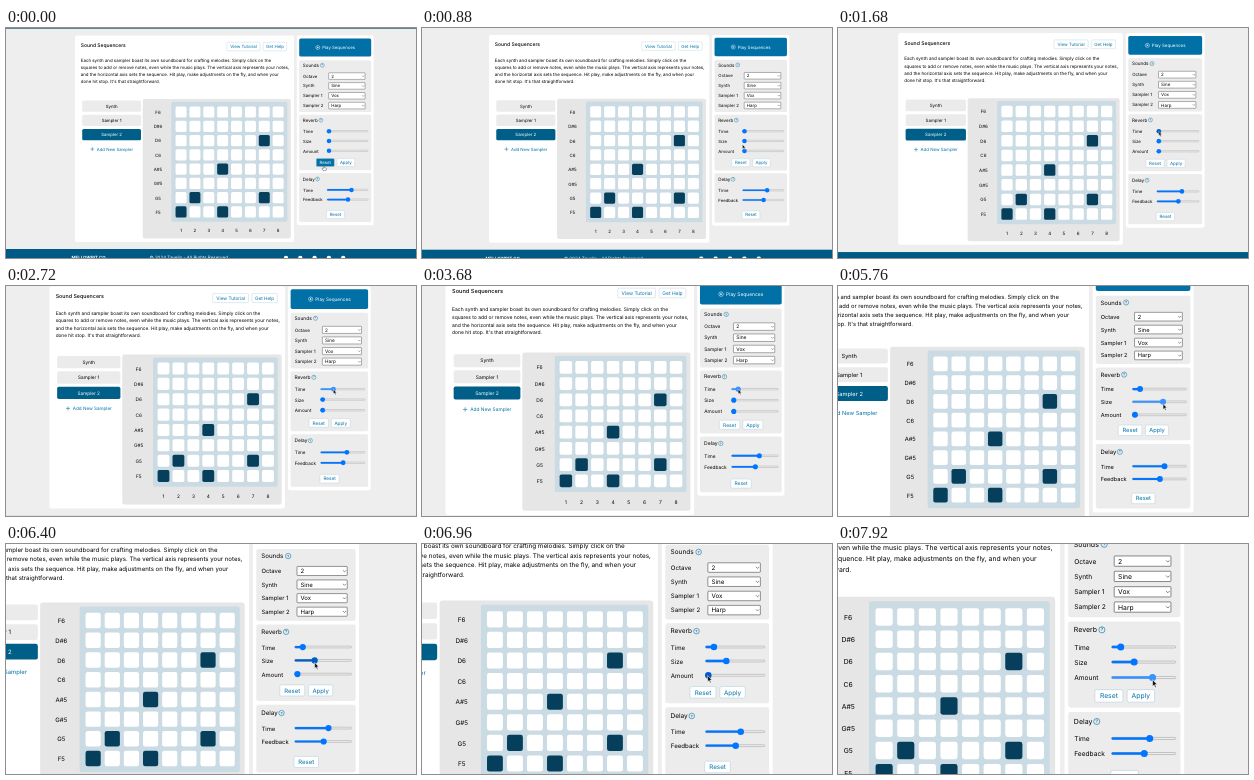
Recreate the animation shown at these times as an HTML page. Size 410 by 230 pixels, loop 8000 ms.

```html
<!DOCTYPE html>
<html lang="en">
<head>
<meta charset="utf-8">
<title>Sound Sequencers</title>
<style>
html, body { margin: 0; width: 100%; height: 100%; overflow: hidden; background: #eee; }
svg { display: block; width: 410px; height: 230px; }
text { font-family: Inter, "Open Sans", sans-serif; text-rendering: geometricPrecision; white-space: pre; }
</style>
</head>
<body>
<svg id="stage" viewBox="0 0 410 230"><g id="page"></g></svg>
<script>
const NS = 'http://www.w3.org/2000/svg';
const page = document.getElementById('page');
const INK = '#000', BLUE = '#0070a6', DEEP = '#005f88', NAVY = '#053f5c';
const LOOP = 8000;

function add(tag, attrs, parent = page) {
  const el = document.createElementNS(NS, tag);
  for (const k in attrs) el.setAttribute(k, attrs[k]);
  parent.appendChild(el);
  return el;
}
const box = (x, y, r, b, fill, rx = 0, more = {}) =>
  add('rect', { x, y, width: r - x, height: b - y, rx, fill, ...more });

// y is the vertical middle of the capitals
function label(str, x, y, size = 4.4, fill = INK, anchor = 'start', weight = 400) {
  const el = add('text', { x, y: y + size * 0.36, 'font-size': size, fill,
    'text-anchor': anchor, 'font-weight': weight });
  el.textContent = str;
  return el;
}

function outlineButton(str, x, r, y, h = 8) {
  const rect = box(x, y - h / 2, r, y + h / 2, '#fff', 1, { stroke: '#a9cadb', 'stroke-width': 0.35 });
  const text = label(str, (x + r) / 2, y, 4.35, BLUE, 'middle');
  return { rect, text };
}

function heading(str, y, iconX) {
  label(str, 296.8, y, 4.5);
  add('circle', { cx: iconX, cy: y, r: 1.95, fill: 'none', stroke: BLUE, 'stroke-width': 0.4 });
  label('?', iconX, y, 3, BLUE, 'middle', 500);
}

function select(name, value, y) {
  label(name, 297, y, 4.25);
  box(322.7, y - 3.3, 359.1, y + 3.3, '#fff', 0.4, { stroke: '#444', 'stroke-width': 0.4 });
  label(value, 325.2, y, 4.35);
  add('path', { d: `M356 ${y - 0.5}l1.1 1.1l1.1 -1.1`, fill: 'none', stroke: '#333', 'stroke-width': 0.4 });
}

const LEFT = 321, MIN = 323, MAX = 359.9;
function slider(name, y, x = MIN) {
  label(name, 297, y + 0.3, 4.25);
  box(LEFT, y - 0.65, 362.2, y + 0.65, '#efefef', 0.65, { stroke: '#8f8f8f', 'stroke-width': 0.3 });
  const fill = box(LEFT, y - 0.8, x, y + 0.8, '#0075ff', 0.8);
  const knob = add('circle', { cx: x, cy: y, r: 2.25, fill: '#0075ff' });
  return { y, set(px, color) {
    fill.setAttribute('width', px - LEFT);
    knob.setAttribute('cx', px);
    fill.setAttribute('fill', color);
    knob.setAttribute('fill', color);
  } };
}

// page frame
box(-100, -30, 510, 0.6, '#00405c');
box(-100, 221, 510, 260, '#005a86');
label('MELLOWBIT CO', 65.5, 229.7, 4.4, '#fff', 'start', 700);
label('© 2024 Tavelin - All Rights Reserved', 143.5, 229.7, 4.5, '#fff');
for (let i = 0; i < 5; i++) add('circle', { cx: 280 + i * 14.3, cy: 230, r: 2.2, fill: '#fff' });

// main panel
box(69, 7.6, 288, 214, '#fff', 2);
label('Sound Sequencers', 74.8, 17.1, 4.97, INK, 'start', 500);
outlineButton('View Tutorial', 220.8, 254.1, 18.5, 8.5);
outlineButton('Get Help', 257.2, 280.8, 18.5, 8.5);
[
  'Each synth and sampler boast its own soundboard for crafting melodies. Simply click on the',
  'squares to add or remove notes, even while the music plays. The vertical axis represents your notes,',
  'and the horizontal axis sets the sequence. Hit play, make adjustments on the fly, and when your',
  "done hit stop. It's that straightforward."
].forEach((line, i) => label(line, 74.8, 32.7 + i * 6.87, 4.4));

['Synth', 'Sampler 1', 'Sampler 2'].forEach((name, i) => {
  const y = 72.4 + i * 14.25, on = i === 2;
  box(76.2, y, 135, y + 11.4, on ? DEEP : '#ebebeb', 1.6);
  label(name, 105.6, y + 5.7, 4.35, on ? '#fff' : INK, 'middle');
});
add('path', { d: 'M84.4 121.1h3.8M86.3 119.2v3.8', stroke: BLUE, 'stroke-width': 0.5 });
label('Add New Sampler', 90.8, 121.1, 4.28, BLUE);

// note grid
box(136.7, 71, 284.8, 210.4, '#e6e6e6', 2);
box(165.3, 73.8, 281.3, 193.8, '#cbdbe4', 1.6);
const lit = ['7,3', '4,5', '2,7', '7,7', '1,8', '4,8'];
['F6', 'D#6', 'D6', 'C6', 'A#5', 'G#5', 'G5', 'F5'].forEach((note, r) => {
  const y = 84 + r * 14.28;
  label(note, 152, y + 0.3, 4.4, INK, 'middle');
  label(String(r + 1), 175.05 + r * 13.87, 202.4, 4.4, INK, 'middle');
  for (let c = 0; c < 8; c++) {
    const x = 175.05 + c * 13.87;
    box(x - 5.5, y - 5.6, x + 5.5, y + 5.6, lit.includes(`${c + 1},${r + 1}`) ? NAVY : '#fff', 1.6);
  }
});

// control panel
box(290.8, 7.6, 367.6, 197.2, '#fff', 2);
box(293.2, 10.4, 365.2, 28.6, BLUE, 1.6);
add('circle', { cx: 311.8, cy: 19.5, r: 2, fill: 'none', stroke: '#fff', 'stroke-width': 0.45 });
add('path', { d: 'M311.2 18.5l1.7 1l-1.7 1z', fill: '#fff' });
label('Play Sequences', 316.2, 19.5, 4.35, '#fff');
[[32.2, 84.1], [86.8, 142.2], [145, 194]].forEach(([y, b]) => box(293.2, y, 365.2, b, '#ececec', 1.6));

heading('Sounds', 37.3, 316.3);
select('Octave', '2', 48.1);
select('Synth', 'Sine', 57.9);
select('Sampler 1', 'Vox', 67.8);
select('Sampler 2', 'Harp', 77.6);

heading('Reverb', 92.2, 314.8);
const sliders = [slider('Time', 103.2), slider('Size', 112.9), slider('Amount', 122.8)];
const reset = outlineButton('Reset', 310.3, 328.3, 134.6);
outlineButton('Apply', 331, 348.6, 134.6);

heading('Delay', 151, 311.5);
slider('Time', 161.9, 345.5);
slider('Feedback', 171.6, 342);
outlineButton('Reset', 320.5, 338.3, 186.4);

// pointers
const pointer = add('g', {});
const skin = { stroke: '#fff', 'stroke-width': 0.35, 'stroke-linejoin': 'round', fill: '#111' };
const arrow = add('path', { d: 'M0 0V4.3L1 3.4L1.7 5L2.4 4.7L1.7 3.1H3z', ...skin }, pointer);
const hand = add('path', { d: 'M-.5 .3Q0 -.3 .5 .3V1.8L2.4 2.3Q2.8 2.5 2.6 3.2L2.1 4.8H-.6L-1.8 2.9Q-1.6 2.2 -.5 3z',
  ...skin, fill: '#fff', stroke: '#111' }, pointer);

// [ms, x, y]
const PATH = [
  [0, 317.8, 137.8], [300, 317.8, 137.8], [1300, 323, 103.4], [1900, 323, 103.4],
  [2700, 333, 103.4], [3500, 326.9, 103.2], [3800, 326.9, 103.2], [4600, 323.2, 114],
  [4950, 323.2, 114], [5760, 344.4, 114.4], [6350, 335.5, 114.4], [6450, 335.5, 114.4],
  [6900, 322.4, 123], [7050, 322.8, 123], [7920, 347.3, 124.2], [8000, 347.8, 124.2]
];
const DRAGS = [[1900, 3700], [4950, 6400], [7050, 8000]];

// [ms, zoom]
const ZOOM = [[0, 1], [1680, 1.026], [3680, 1.135], [4880, 1.231], [5760, 1.314],
  [6960, 1.442], [7920, 1.558], [8000, 1.568]];
const FX = 406, FY = 103.6;

const segment = (table, t) => {
  let i = 0;
  while (i < table.length - 2 && t >= table[i + 1][0]) i++;
  return i;
};

function cursorAt(t) {
  const i = segment(PATH, t), a = PATH[i], b = PATH[i + 1];
  let k = Math.min(1, (t - a[0]) / (b[0] - a[0]));
  k = k * k * (3 - 2 * k);
  return [a[1] + (b[1] - a[1]) * k, a[2] + (b[2] - a[2]) * k];
}

function slope(i) {
  if (i === 0) return 0;
  const a = ZOOM[i - 1], b = ZOOM[Math.min(i + 1, ZOOM.length - 1)];
  return (b[1] - a[1]) / (b[0] - a[0]);
}

function zoomAt(t) {
  const i = segment(ZOOM, t), [t0, a] = ZOOM[i], [t1, b] = ZOOM[i + 1];
  const d = t1 - t0, k = (t - t0) / d, k2 = k * k, k3 = k2 * k;
  return a * (2 * k3 - 3 * k2 + 1) + b * (3 * k2 - 2 * k3)
    + d * (slope(i) * (k3 - 2 * k2 + k) + slope(i + 1) * (k3 - k2));
}

function draw(t) {
  const s = zoomAt(t), [x, y] = cursorAt(t);
  page.setAttribute('transform', `translate(${FX * (1 - s)} ${FY * (1 - s)}) scale(${s})`);
  pointer.setAttribute('transform', `translate(${x} ${y})`);

  sliders.forEach((sl, i) => {
    const [from, to] = DRAGS[i];
    const px = t < from ? MIN : Math.max(MIN, Math.min(MAX, cursorAt(Math.min(t, to))[0]));
    const over = Math.hypot(x - px, y - sl.y) < 2.4;
    sl.set(px, t >= from && t < to ? '#3793ff' : over ? '#005cc8' : '#0075ff');
  });

  const onReset = x > 310.3 && x < 328.3 && y > 130.6 && y < 138.6;
  reset.rect.setAttribute('fill', onReset ? BLUE : '#fff');
  reset.text.setAttribute('fill', onReset ? '#fff' : BLUE);
  hand.setAttribute('visibility', onReset ? 'visible' : 'hidden');
  arrow.setAttribute('visibility', onReset ? 'hidden' : 'visible');
}

const start = performance.now();
function tick() {
  draw((performance.now() - start) % LOOP);
  requestAnimationFrame(tick);
}
draw(0);
requestAnimationFrame(tick);
</script>
</body>
</html>
```
